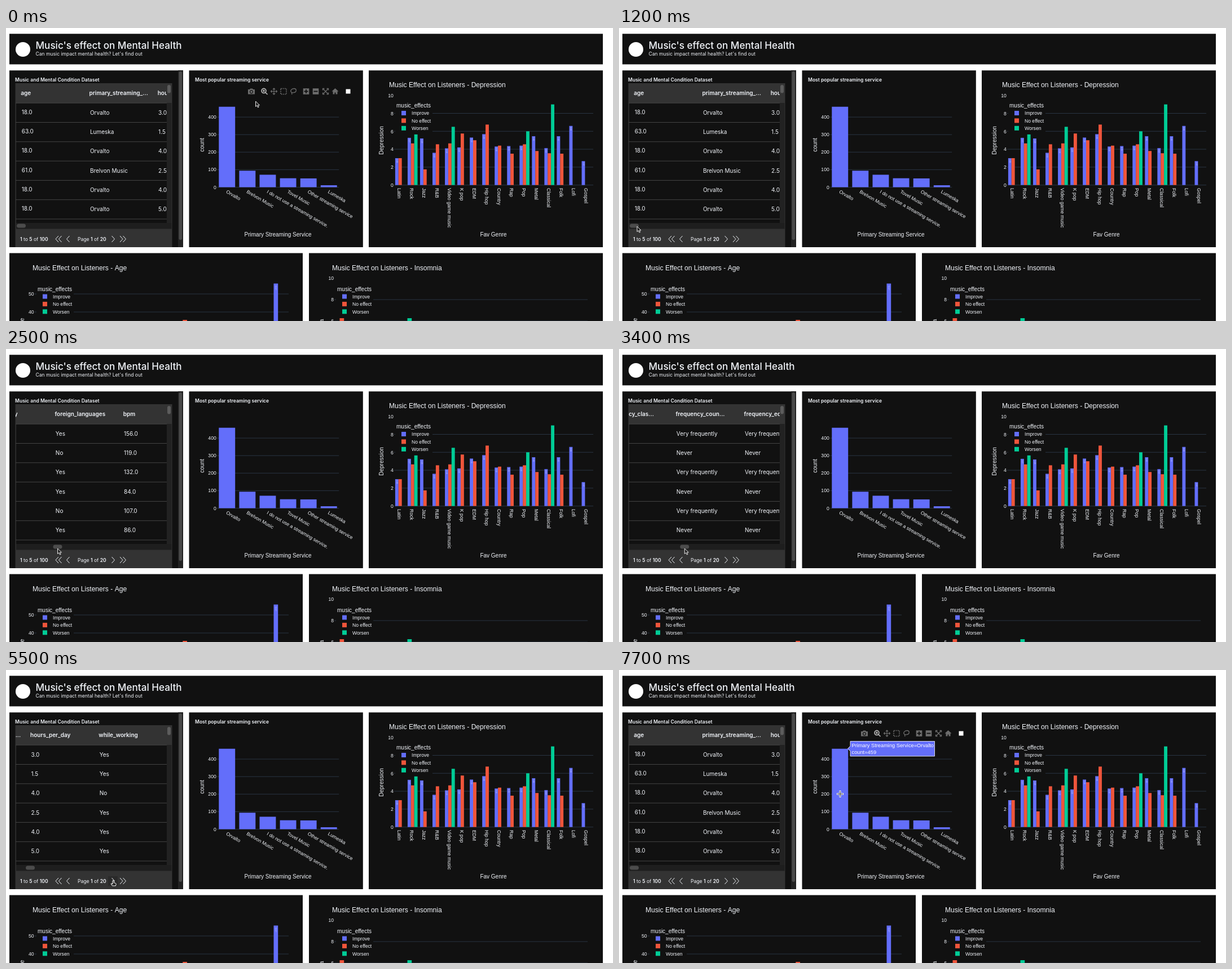
An HTML page with a canvas for the animation above (8000 ms loop, 1076 by 520 pixels).

```html
<!DOCTYPE html>
<html lang="en">
<head>
<meta charset="utf-8">
<title>Music's effect on Mental Health</title>
<style>
html, body { margin: 0; width: 100%; height: 100%; overflow: hidden; background: #fff; }
canvas { display: block; }
</style>
</head>
<body>
<canvas id="stage" width="1076" height="520"></canvas>
<script>
const ctx = document.getElementById('stage').getContext('2d');
const LOOP = 8000, STEP = 100;
const PANEL = '#111', INK = '#f2f5fa', GRID = '#283442', ICON = '#6c6c6c';
const SERIES = [['Improve', '#636efa'], ['No effect', '#ef553b'], ['Worsen', '#00cc96']];
const BLUE = SERIES[0][1];
const sans = size => `${size}px "Liberation Sans", Arial, sans-serif`;
const inter = (size, weight = 400) => `${weight} ${size}px Inter, sans-serif`;
const TICK = sans(8.6), LABEL = sans(10), TITLE = sans(12.1);

// ---- drawing helpers
function rect(x, y, w, h, color) {
  ctx.fillStyle = color;
  ctx.fillRect(x, y, w, h);
}
function pill(x, y, w, h, color) {
  ctx.fillStyle = color;
  ctx.beginPath();
  ctx.roundRect(x, y, w, h, Math.min(w, h) / 2);
  ctx.fill();
}
function text(str, x, y, font, align = 'left', degrees = 0, color = INK) {
  ctx.save();
  ctx.translate(x, y);
  ctx.rotate(degrees * Math.PI / 180);
  ctx.font = font;
  ctx.textAlign = align;
  ctx.fillStyle = color;
  ctx.fillText(str, 0, 0);
  ctx.restore();
}
function path(d, x, y, stroke, width = 1, fill) {
  const shape = new Path2D(d);
  ctx.save();
  ctx.translate(x, y);
  ctx.lineJoin = 'round';
  if (fill) { ctx.fillStyle = fill; ctx.fill(shape); }
  if (stroke) { ctx.strokeStyle = stroke; ctx.lineWidth = width; ctx.stroke(shape); }
  ctx.restore();
}
function clipped(x, y, w, h, draw) {
  ctx.save();
  ctx.beginPath();
  ctx.rect(x, y, w, h);
  ctx.clip();
  draw();
  ctx.restore();
}

// ---- table
const COLUMN_WIDTH = 121.2, SCROLL_RATIO = 14.1;
const split = list => list.split(',');
const often = split('Never,Rarely,Sometimes,Very frequently');
const genres = split('Latin,Rock,Jazz,R&B,Video game music,K pop,EDM,Hip hop,Country,Rap,Pop,Metal,Classical,Folk,Lofi,Gospel');
const columns = [
  ['age', '18.0,63.0,18.0,61.0,18.0,18.0'],
  ['primary_streaming_...', 'Orvalto,Lumeska,Orvalto,Brelvon Music,Orvalto,Orvalto'],
  ['hours_per_day', '3.0,1.5,4.0,2.5,4.0,5.0'],
  ['while_working', 'Yes,Yes,No,Yes,Yes,Yes'],
  ['instrumentalist', 'Yes,No,No,No,No,Yes'],
  ['composer', 'Yes,No,No,Yes,No,Yes'],
  ['fav_genre', 'Latin,Rock,Video game music,Jazz,R&B,Jazz'],
  ['exploratory', 'Yes,Yes,No,Yes,Yes,Yes'],
  ['foreign_languages', 'Yes,No,Yes,Yes,No,Yes'],
  ['bpm', '156.0,119.0,132.0,84.0,107.0,86.0'],
  ...[...genres].sort().map((genre, g) => [`frequency_${genre.slice(0, 4).toLowerCase()}...`,
    [0, 1, 2, 3, 4, 5].map(row => often[(g * 3 + row * row + (g >> 1)) % 4]).join()]),
  ['anxiety', '3.0,7.0,7.0,9.0,7.0,8.0'],
  ['depression', '0.0,2.0,7.0,7.0,2.0,8.0'],
  ['insomnia', '1.0,2.0,10.0,3.0,5.0,7.0'],
  ['ocd', '0.0,1.0,2.0,3.0,9.0,7.0'],
].map(([name, cells]) => [name, split(cells)]);

function mixedText(parts, x, y) {
  parts.forEach((part, i) => {
    const font = inter(8.57, i % 2 ? 400 : 600);
    text(part, x, y, font);
    ctx.font = font;
    x += ctx.measureText(part).width;
  });
}
function table(thumb, nextHovered) {
  text('Music and Mental Condition Dataset', 16, 94.5, inter(8.57, 600));
  rect(305, 75, 9, 314, '#222');
  pill(306.5, 77, 5.5, 299, '#4a4a4a');
  rect(16.5, 98, 278, 291, '#333');
  rect(18, 133, 267, 213, PANEL);
  rect(285, 133, 8.5, 213, '#222');
  rect(18, 346, 275.5, 10.5, '#1e1e1e');
  pill(286, 101, 6, 14.5, '#5c5c5c');
  pill(19 + thumb, 347.5, 16, 7, '#4c4c4c');
  clipped(17, 98, 268, 248, () => {
    for (let row = 0; row < 7; row++) rect(17, 132.7 + row * 34.3, 268, 1, '#444');
    columns.forEach(([name, cells], c) => {
      const x = 26.3 + c * COLUMN_WIDTH - thumb * SCROLL_RATIO;
      if (x < -120 || x > 290) return;
      text(name, x, 119, inter(10, 600));
      cells.forEach((cell, row) => text(cell, x + 1.4, (c ? 154 : 153) + row * 34.2, inter(10)));
    });
  });
  mixedText(['1', ' to ', '5', ' of ', '100'], 25, 377.5);
  mixedText(['', 'Page ', '1', ' of ', '20'], 127, 377.5);
  if (nextHovered) rect(181, 366, 17, 17, '#2a2a2a');
  for (const x of [88, 93.5, 107.5]) path('M5 0L0 5.5L5 11', x, 369, INK);
  for (const x of [187.5, 202, 207.5]) path('M0 0L5 5.5L0 11', x, 369, INK);
}

// ---- charts
const services = [['Orvalto', 459], ['Brelvon Music', 94], ['I do not use a streaming service.', 71],
  ['Tovel Music', 51], ['Other streaming service', 50], ['Lumeska', 11]];
const scores = [[3, 3], [5.27, 4.65, 5.65], [5.2, 1.75], [3.6, 4.55], [4.1, 4.65, 6.5], [4.2, 5.75], [5.3, 5],
  [5.68, 6.75], [4.3, 4.4], [4.35, 3.5], [4.4, 4.55, 6], [5.45, 3.8], [4.12, 3.55, 9], [5.45, 3.5], [6.6], [2.67]];

function serviceChart() {
  const left = 373.7, bottom = 282.5, step = 36.1;
  text('Most popular streaming service', 335, 94.5, inter(8.57, 600));
  for (let n = 0; n <= 400; n += 100) {
    const y = bottom - n * 0.311;
    rect(left, y - 0.5, 216.5, 1, GRID);
    text(n, left - 1, y + 3, TICK, 'right');
  }
  services.forEach(([name, n], i) => {
    const x = left + i * step;
    rect(x + 3.6, bottom - n * 0.311, 28.9, n * 0.311, BLUE);
    text(name, x + step / 2 - 2.2, 292.3, TICK, 'left', 30);
  });
  text('count', 350.5, 207.5, LABEL, 'center', -90);
  text('Primary Streaming Service', 482, 370, LABEL, 'center');
}
function legend(x, y) {
  rect(x - 2, y - 11.5, 66, 57, PANEL);
  text('music_effects', x, y, LABEL);
  SERIES.forEach(([name, color], i) => {
    rect(x + 9, y + 6 + i * 13.4, 8, 8, color);
    text(name, x + 27, y + 13.3 + i * 13.4, TICK);
  });
}
function tinyLabel(value, x, y) {
  text(value, x, y + 2, sans(3.2), 'left', 90, '#ffffffb0');
}
function gridLine(value, left, right, y) {
  rect(left, y - 0.5, right - left, 1, GRID);
  text(value, left - 1, y + 3.2, TICK, 'right');
}
function depressionChart() {
  const left = 687.8, right = 1041, bottom = 278.7, unit = 15.9, step = 22.04, bar = 5.87;
  text('Music Effect on Listeners - Depression', 679, 105, TITLE);
  for (let n = 0; n <= 8; n += 2) gridLine(n, left, right, bottom - n * unit);
  text(10, left - 1, 122.8, TICK, 'right');
  scores.forEach((group, g) => {
    const x = left + 2.1 + g * step;
    group.forEach((score, s) => rect(x + s * bar, bottom - score * unit, bar, score * unit, SERIES[s][1]));
    tinyLabel(group[0].toFixed(2), x + 2, bottom - group[0] * unit);
    text(genres[g], x + 4.5, 284, TICK, 'left', 90);
  });
  legend(692, 141);
  text('Depression', 669, 199.5, LABEL, 'center', -90);
  text('Fav Genre', 864, 370, LABEL, 'center');
}
function ageChart() {
  text('Music Effect on Listeners - Age', 47, 430, TITLE);
  gridLine(50, 50.5, 501, 472);
  gridLine(40, 50.5, 501, 504);
  rect(474.5, 453.5, 7.7, 70, BLUE);
  tinyLabel('55.67', 477.2, 455);
  rect(313.3, 518, 7.7, 2, SERIES[1][1]);
  legend(56, 466.5);
  text('Age', 32, 523.5, LABEL, 'center', -90);
}
function insomniaChart() {
  text('Music Effect on Listeners - Insomnia', 578, 430, TITLE);
  text(10, 581, 447.2, TICK, 'right');
  gridLine(8, 582, 1031, 482);
  gridLine(6, 582, 1031, 520);
  rect(591.5, 515, 7.7, 5, SERIES[1][1]);
  rect(711.5, 515, 7.7, 5, SERIES[2][1]);
  legend(587, 466.5);
  text('Insomnia', 562.5, 537, LABEL, 'center', -90);
}
function toolbar() {
  const y = 112.5;
  path('M-6-3.5H-3L-2-5H2L3-3.5H6V5H-6Z', 435, y, null, 0, ICON);
  path('M2.5 .8A2.5 2.5 0 1 1 2.5 .7Z', 435, y, PANEL, 1.2);
  path('M3-1A4 4 0 1 1 3-1.1M2 2L5.5 5.5M-3-1H1M-1-3V1', 458, y, '#b5b5b5', 1.7);
  path('M-5 0H5M0-5V5M-3.5-2L-5.5 0L-3.5 2M3.5-2L5.5 0L3.5 2M-2-3.5L0-5.5L2-3.5M-2 3.5L0 5.5L2 3.5', 475, y, ICON, 1.2);
  ctx.setLineDash([2, 1.4]);
  path('M-5-5H5V5H-5Z', 492, y, ICON, 1.6);
  ctx.setLineDash([]);
  path('M-3 2C-7-1-3-5 1-5C6-5 6 1 1 2C-1 3-3 1-3 3C-3 4-2 4-3 5.5', 509.5, y, ICON, 1.3);
  for (const [x, sign] of [[532, 'M-3.5 0H3.5M0-3.5V3.5'], [549, 'M-3.5 0H3.5']]) {
    rect(x - 5.3, y - 5.3, 10.6, 10.6, ICON);
    path(sign, x, y, PANEL, 1.8);
  }
  path('M-5-2V-5H-2M2-5H5V-2M5 2V5H2M-2 5H-5V2M-4-4L4 4M4-4L-4 4', 566.5, y, ICON, 1.3);
  path('M-6 0L0-5.5L6 0H4V5H1V2H-1V5H-4V0Z', 583.5, y, null, 0, ICON);
  rect(602.5, y - 4, 8, 8, '#fff');
}
function tooltip() {
  path('M405.5 139.5L410 135V126.5H559.5V153H410V144Z', 0, 0, '#fff', 0.8, BLUE);
  text('Primary Streaming Service=Orvalto', 412.5, 137, sans(9.28), 'left', 0, '#fff');
  text('count=459', 412.5, 149, sans(9.28), 'left', 0, '#fff');
}

// ---- pointer: time, x, y
const route = [[100, 442.5, 130], [1000, 56, 352], [1200, 32, 352], [1400, 27, 354], [1600, 27, 354],
  [2000, 52, 354], [2100, 52, 354], [2500, 91.5, 354], [2900, 91.5, 354], [3100, 108, 354], [3300, 108, 354],
  [3600, 140, 354], [3700, 140, 354], [4200, 251, 355], [4600, 150, 372], [5100, 43, 362], [5500, 190, 374],
  [5700, 190, 374], [6600, 404, 264], [6900, 404, 264], [7700, 392, 220]];
function pointerAt(t) {
  const next = route.findIndex(key => key[0] >= t);
  if (next < 1) return route[next < 0 ? route.length - 1 : 0].slice(1);
  const [t0, x0, y0] = route[next - 1], [t1, x1, y1] = route[next];
  const p = (t - t0) / (t1 - t0), ease = p * p * (3 - 2 * p);
  return [x0 + (x1 - x0) * ease, y0 + (y1 - y0) * ease];
}
function pointer(x, y, kind) {
  if (kind === 'cross') {
    path('M-6 0H6M0-6V6', x, y, '#fff', 3);
    path('M-5 0H5M0-5V5', x, y, '#222', 1);
  } else if (kind === 'hand') {
    path('M-1 0Q.2-1.2 1.2 0V3.5L4.5 4.5Q5.5 5 5 7L4.3 9H-1.5L-4 5.5Q-3.5 4-1 6Z', x, y, '#fff', 1, '#222');
  } else {
    path('M0 0V9.5L2.3 7.5L4 11L5.6 10.2L4 7H7Z', x, y, '#e8e8e8', 1, '#222');
  }
}

function draw(t) {
  const [x, y] = pointerAt(t);
  const reloaded = t >= 6300;
  const thumb = t < 1600 || reloaded ? 0 : t < 5100 ? x - 27 : 16;
  const nextHovered = t > 5000 && Math.abs(x - 190) < 9 && y > 366;
  const overServices = x > 324 && x < 633 && y > 75 && y < 389;
  const overPlot = x > 374 && x < 590 && y > 132 && y < 283;

  rect(0, 0, 1076, 520, '#fff');
  rect(6, 10.3, 1052, 54.2, PANEL);
  rect(6, 75.3, 308, 313.7, PANEL);
  rect(324.5, 75.3, 308.3, 313.7, PANEL);
  rect(643, 75.3, 415, 313.7, PANEL);
  rect(6, 399.5, 520, 121, PANEL);
  rect(537, 399.5, 521, 121, PANEL);

  pill(17, 25, 26, 26, '#fff');
  text("Music's effect on Mental Health", 52.5, 36.5, inter(17.1, 500));
  text("Can music impact mental health? Let's find out", 52.5, 49, inter(8.57));

  table(thumb, nextHovered);
  serviceChart();
  if (!reloaded || t >= 6700) depressionChart();
  if (!reloaded || t >= 7000) { ageChart(); insomniaChart(); }
  if (overServices) toolbar();
  if (t >= 7000) tooltip();
  pointer(x, y, nextHovered ? 'hand' : overPlot ? 'cross' : 'arrow');
}
function frame(now) {
  draw(Math.floor(now % LOOP / STEP) * STEP);
  requestAnimationFrame(frame);
}
requestAnimationFrame(frame);
</script>
</body>
</html>
```
